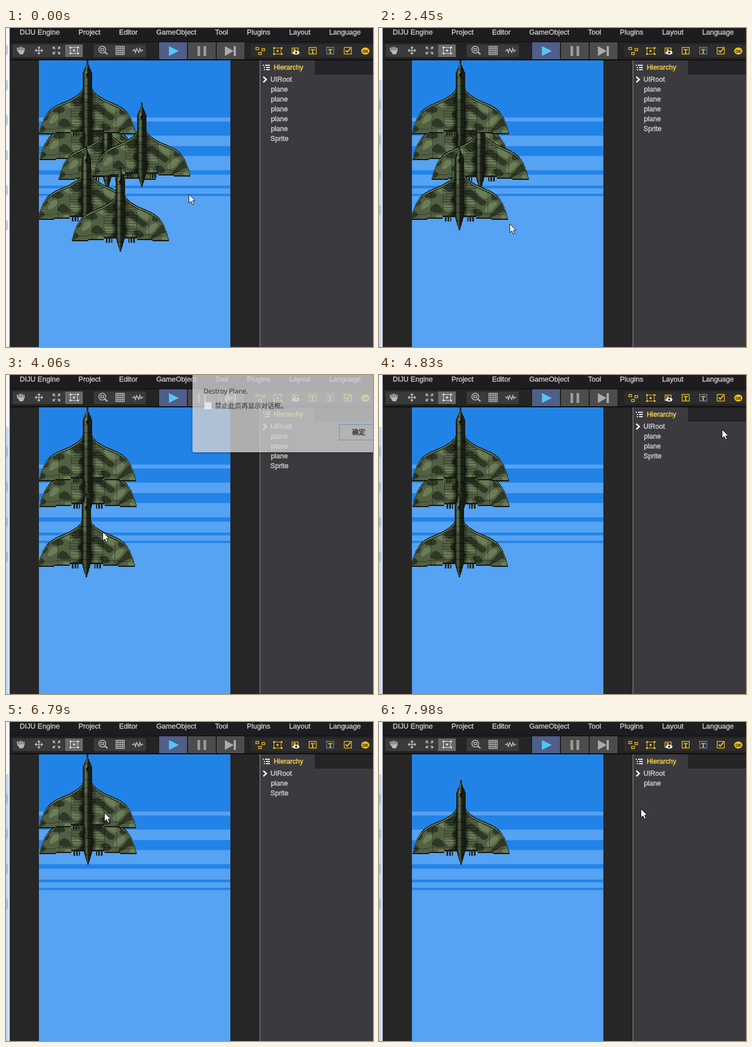
These frames come from a looping animation (669x582 px, 8 s). An HTML page with a canvas:

```html
<!DOCTYPE html>
<html lang="en">
<head>
<meta charset="utf-8">
<title>Plane scene in an editor</title>
<style>
html, body { margin: 0; width: 100%; height: 100%; overflow: hidden; background: #262626; }
canvas { display: block; }
</style>
</head>
<body>
<canvas id="stage" width="669" height="582"></canvas>
<script>
const LOOP = 8000, STEP = 70;
const SANS = '"Liberation Sans", Arial, sans-serif';
const CJK = '"Noto Sans", "Noto Sans CJK SC", "Noto Sans CJK", sans-serif';
const PALE = '#b9b9b9', GOLD = '#f2c21b';
const ctx = document.getElementById('stage').getContext('2d');

// Back to front: centre x and nose y.
const planes = [
  { x: 149, y: 106 }, { x: 184, y: 142 }, { x: 247, y: 136 },
  { x: 146, y: 215 }, { x: 208, y: 254 }, { x: 148, y: 59 }
];

// Each round: the pointer aims, hits a plane, then confirms the message box.
const rounds = [
  { plane: 2, hit: 840, close: 1680, aim: [255, 220], ok: [640, 90] },
  { plane: 4, hit: 2450, close: 3220, aim: [238, 357], ok: [623, 114] },
  { plane: 1, hit: 3920, close: 4760, aim: [176, 286], ok: [628, 98] },
  { plane: 3, hit: 5530, close: 6370, aim: [168, 315], ok: [651, 120] },
  { plane: 5, hit: 7000, close: 7770, aim: [173, 166], ok: [622, 107] }
];

const easeInOut = u => u < .5 ? 4 * u ** 3 : 1 - 4 * (1 - u) ** 3;
const easeOut = u => 1 - (1 - u) ** 5;

// Pointer moves follow from the rounds.
const moves = [];
rounds.forEach(({ hit, close, aim, ok }, i) => {
  moves.push({ from: i ? rounds[i - 1].close : 350, to: hit - 140, end: aim, ease: easeInOut });
  moves.push({ from: hit + 280, to: close - 140, end: ok, ease: easeOut });
});
moves.push({ from: 7770, to: 7980, end: [477, 158], ease: u => u });

function box(g, color, x, y, w, h) {
  g.fillStyle = color;
  g.fillRect(x, y, w, h);
}

function shape(g, color, ...points) {
  g.fillStyle = color;
  g.beginPath();
  points.forEach(p => g.lineTo(...p));
  g.closePath();
  g.fill();
}

function line(g, color, width, ...points) {
  g.strokeStyle = color;
  g.lineWidth = width;
  g.beginPath();
  points.forEach(p => g.lineTo(...p));
  g.stroke();
}

function frame(g, color, x, y, w, h, width = 1) {
  g.strokeStyle = color;
  g.lineWidth = width;
  g.strokeRect(x, y, w, h);
}

function dot(g, color, x, y, rx, ry = rx) {
  g.fillStyle = color;
  g.beginPath();
  g.ellipse(x, y, rx, ry, 0, 0, 7);
  g.fill();
}

function label(g, text, x, y, size, color, family = SANS, weight = .45) {
  g.font = size + 'px ' + family;
  g.fillStyle = g.strokeStyle = color;
  g.lineWidth = weight;
  g.fillText(text, x, y);
  if (weight) g.strokeText(text, x, y);
}

function layer(w, h, paint) {
  const c = document.createElement('canvas');
  c.width = w;
  c.height = h;
  paint(c.getContext('2d'));
  return c;
}

// Half width of the hull at height y.
function hullWidth(y) {
  if (y < 5) return 1;
  if (y > 127) return 8 - 7 * ((y - 127) / 26) ** 1.2;
  return Math.min(8, 1 + (y - 5) * .42);
}

// Brightness of a hull pixel: a lit stripe left of the middle.
function hullTone(x, y, half) {
  const side = x / half;
  if (Math.abs(side) > .9) return .17;
  if (Math.hypot(x, (y - 25) / 2) < 2.6) return x < 0 && y < 24 ? 1.5 : .2;
  const lit = Math.max(0, 1 - Math.abs(side + .35) / .55);
  const seam = y % 15 === 1 ? .5 : 1;
  return (.28 + (y < 70 ? .95 : .65) * lit) * seam;
}

// Brightness of a wing pixel, or 0 outside the wing.
function wingTone(x, y) {
  const a = Math.abs(x);
  const u = (a - 8) / 80;
  if (u < 0 || u > 1) return 0;
  if (a > 14 && a < 29 && (a - 14) % 5 < 3 && y > 126 && y < 138) return (a - 14) % 5 === 1 ? .6 : .15;
  const depth = y - (47 + 43 * Math.sqrt(u) + 40 * u ** 7);
  const rear = (a > 58 ? 134 : a > 30 ? 132 : 129) - y;
  if (depth < 0 || rear < 0) return 0;
  if (depth < 1.5 || rear < 2) return .16;
  if (depth < 4) return 1.15;
  if (depth < 5.5) return .4;
  const camo = Math.sin(x * .16 + 1.6 * Math.sin(y * .1)) + Math.sin(y * .24 + 1.8 * Math.sin(x * .1) + 1);
  let tone = camo > .8 ? 1.2 : camo < -.55 ? .53 : .92;
  if (a < 30 && y % 5 === 2 || a === 30 || a === 52 || rear === 9) tone *= .6;
  return tone * Math.min(1, .4 + (a - 8) / 14);
}

const plane = layer(180, 156, g => {
  for (let y = 0; y < 154; y++) {
    const half = hullWidth(y);
    for (let x = -89; x < 90; x++) {
      const k = Math.abs(x) <= half ? hullTone(x, y, half) : wingTone(x, y);
      if (k) box(g, `rgb(${88 * k},${104 * k},${72 * k})`, x + 90, y, 1, 1);
    }
  }
});

function arrows(g, x, y, turn, inner, outer) {
  for (let i = 0; i < 4; i++) {
    g.save();
    g.translate(x, y);
    g.rotate(turn + i * Math.PI / 2);
    line(g, PALE, 1.5, [0, inner], [0, outer]);
    shape(g, PALE, [-3.2, outer - 2], [3.2, outer - 2], [0, outer + 2]);
    g.restore();
  }
}

function bounds(g, x, y, color) {
  frame(g, color, x - 6.5, y - 5.5, 13, 11);
  for (const dx of [-8, 6]) for (const dy of [-7, 4]) box(g, color, x + dx, y + dy, 3, 3);
  dot(g, color, x, y, 2);
}

function viewTools(g) {
  box(g, '#3a3a3b', 12, 30, 128, 23);
  box(g, '#69696b', 108, 30, 32, 23);
  box(g, '#3a3a3b', 160, 30, 95, 23);
  for (let i = 0; i < 5; i++) {
    line(g, PALE, 2, [20.5 + 3.1 * i, 34 + Math.abs(i - 2)], [22 + 2.6 * i, 43]);
  }
  shape(g, PALE, [21, 41], [34, 41], [31, 48], [25, 48]);
  arrows(g, 60, 41, 0, 0, 6);
  arrows(g, 92, 41, Math.PI / 4, 3, 8);
  bounds(g, 124, 41, '#dcdcdc');

  g.strokeStyle = PALE;
  g.lineWidth = 1.6;
  g.beginPath();
  g.arc(175.5, 39.5, 6.2, 0, 7);
  g.stroke();
  frame(g, PALE, 173, 37.5, 5, 4, 1.4);
  line(g, PALE, 2.4, [180, 44], [185, 48]);
  frame(g, PALE, 200.5, 33.5, 15, 15, 1.4);
  for (let i = 0; i < 3; i++) {
    line(g, PALE, 1.3, [201, 37 + 4 * i], [215, 37 + 4 * i]);
    line(g, PALE, 1.3, [204 + 4 * i, 34], [204 + 4 * i, 48]);
  }
  const pulse = [];
  for (let x = -10; x <= 10; x += 2) pulse.push([240 + x, 41 + 8 * Math.sin(x * 1.3) * Math.exp(-x * x / 25)]);
  line(g, PALE, 1.6, ...pulse);
}

function playTools(g) {
  box(g, '#111', 278, 26, 158, 31);
  for (let i = 0; i < 3; i++) box(g, i ? '#4c4c4d' : '#505f89', 279 + 52.5 * i, 26, 51, 31);
  shape(g, '#56c5f3', [297, 33], [315, 42], [297, 51]);
  box(g, '#999', 349, 33, 5, 18);
  box(g, '#999', 360, 33, 5, 18);
  shape(g, '#aaa', [399, 33], [415, 42], [399, 51]);
  box(g, '#aaa', 415, 33, 4, 18);
}

function nodeTools(g) {
  const slot = i => 463 + 32 * i;
  box(g, '#2d2d2e', 447, 30, 222, 23);
  for (const [dx, dy] of [[-7.5, -6.5], [3.5, -4.5], [-2.5, 2.5]]) frame(g, GOLD, slot(0) + dx, 42 + dy, 5, 4, 1.3);
  bounds(g, slot(1), 42, GOLD);
  frame(g, GOLD, slot(2) - 5.5, 36.5, 11, 10, 1.3);
  dot(g, GOLD, slot(2) - 1, 40, 2);
  dot(g, '#fff', slot(2) + 2, 45, 6, 3.5);
  dot(g, '#222', slot(2) + 2, 45, 2);
  g.textAlign = 'center';
  for (const i of [3, 4, 5]) {
    g.setLineDash(i === 4 ? [2, 1] : []);
    frame(g, i === 4 ? '#7fa8ff' : GOLD, slot(i) - 6.5, 35.5, 13, 12, 1.3);
    g.setLineDash([]);
    if (i < 5) label(g, 'T', slot(i), 46, 11, GOLD, '"Liberation Serif", serif', .8);
  }
  line(g, GOLD, 2, [619, 41], [622, 44], [628, 37]);
  dot(g, GOLD, slot(6), 42, 7.5, 6.5);
  label(g, 'OK', slot(6), 44.5, 7, '#34290b');
  g.textAlign = 'left';
}

const backdrop = layer(669, 582, g => {
  box(g, '#262626', 0, 0, 669, 582);
  box(g, '#1d1d20', 7, 0, 662, 25);
  box(g, '#0c0c0d', 7, 25, 662, 34);
  box(g, '#242425', 7, 26, 662, 31);
  let x = 25;
  for (const name of ['DIJU Engine', 'Project', 'Editor', 'GameObject', 'Tool', 'Plugins', 'Layout', 'Language']) {
    label(g, name, Math.round(x), 12, 13, '#d0d0d0', SANS, .35);
    x += g.measureText(name).width + 34;
  }
  viewTools(g);
  playTools(g);
  nodeTools(g);

  box(g, '#2283e7', 60, 59, 349, 523);
  for (const [top, h] of [[164, 7], [197, 19], [234, 26], [268, 20], [293, 10], [307, 276]]) {
    box(g, '#56a2f3', 60, top - .5, 349, h);
  }

  box(g, '#67676a', 462, 59, 2, 523);
  box(g, '#3b3b3f', 464, 59, 205, 523);
  box(g, '#252527', 563, 59, 106, 26);
  for (let i = 0; i < 3; i++) {
    const left = i ? 470 : 468;
    box(g, '#ededed', left, 67 + 4 * i, 2, 2);
    box(g, '#ededed', left + 4, 67 + 4 * i, 477 - left, 2);
  }
  label(g, 'Hierarchy', 488, 76, 12.6, '#f2d04c');
  line(g, '#f2f2f2', 2.6, [469, 89], [474.5, 94], [469, 99]);
  label(g, 'UIRoot', 482, 98, 12.6, '#cecece');
});

// Sliver of the window behind the editor.
function edge(t) {
  box(ctx, '#f5f8fc', 0, 0, 6, 582);
  box(ctx, '#9aa5b1', 6, 0, 1, 582);
  if (t >= 420) box(ctx, '#c4daef', 0, 95, 5, 487);
  for (let y = t < 420 ? 40 : 140; y < 380; y += 64) dot(ctx, 'rgba(125,160,195,.45)', 1, y, 3, 10);
}

function hierarchy(t) {
  const closed = rounds.filter(r => t >= r.close).length;
  const rows = Array(Math.max(1, 5 - closed)).fill('plane');
  if (closed < 5) rows.push('Sprite');
  rows.forEach((name, i) => label(ctx, name, name === 'plane' ? 483 : 482, 116 + 18 * i, 12.6, '#cecece'));
}

function dialog(t) {
  const index = rounds.findIndex(r => t > r.hit && t < r.close);
  if (index < 0) return;
  const extra = index ? 30 : 0;
  ctx.save();
  ctx.globalAlpha = Math.min(1, (t - rounds[index].hit) / (3 * STEP));
  ctx.shadowColor = 'rgba(0,0,0,.6)';
  ctx.shadowBlur = 4;
  ctx.shadowOffsetY = 1;
  ctx.fillStyle = '#fbfbfb';
  ctx.beginPath();
  ctx.roundRect(340, -10, 350, 121 + extra, 3);
  ctx.fill();
  ctx.shadowColor = 'transparent';
  label(ctx, 'Destroy Plane.', 360, 34, 12, '#111', CJK, .15);
  if (extra) {
    box(ctx, '#fff', 361, 49, 14, 14);
    frame(ctx, '#a8c4df', 361.5, 49.5, 13, 13);
    label(ctx, '禁止此页再显示对话框。', 381, 61, 12, '#111', CJK, .15);
  }
  frame(ctx, '#3a83d2', 607.5, 60.5 + extra, 72, 28);
  label(ctx, '确定', 631, 79 + extra, 12, '#111', CJK, .5);
  ctx.restore();
}

function cursor(t) {
  let [x, y] = [333, 303];
  for (const { from, to, end, ease } of moves) {
    if (t < from) break;
    const e = ease(Math.min(1, (t - from) / (to - from)));
    x += (end[0] - x) * e;
    y += (end[1] - y) * e;
  }
  ctx.save();
  ctx.translate(Math.round(x) + .5, Math.round(y) + .5);
  shape(ctx, '#fff', [0, 0], [0, 16], [3.8, 12.5], [6.4, 18.5], [9, 17.3], [6.5, 11.5], [11.3, 11.5]);
  ctx.strokeStyle = '#111';
  ctx.lineWidth = 1;
  ctx.stroke();
  ctx.restore();
}

function draw(now) {
  const t = Math.floor(now % LOOP / STEP) * STEP;
  ctx.drawImage(backdrop, 0, 0);
  edge(t);
  ctx.save();
  ctx.beginPath();
  ctx.rect(60, 59, 349, 523);
  ctx.clip();
  planes.forEach(({ x, y }, i) => {
    if (!rounds.some(r => r.plane === i && t >= r.hit)) ctx.drawImage(plane, x - 90, y);
  });
  ctx.restore();
  hierarchy(t);
  dialog(t);
  cursor(t);
}

const start = performance.now();
function tick() {
  draw(performance.now() - start);
  requestAnimationFrame(tick);
}
tick();
</script>
</body>
</html>
```
